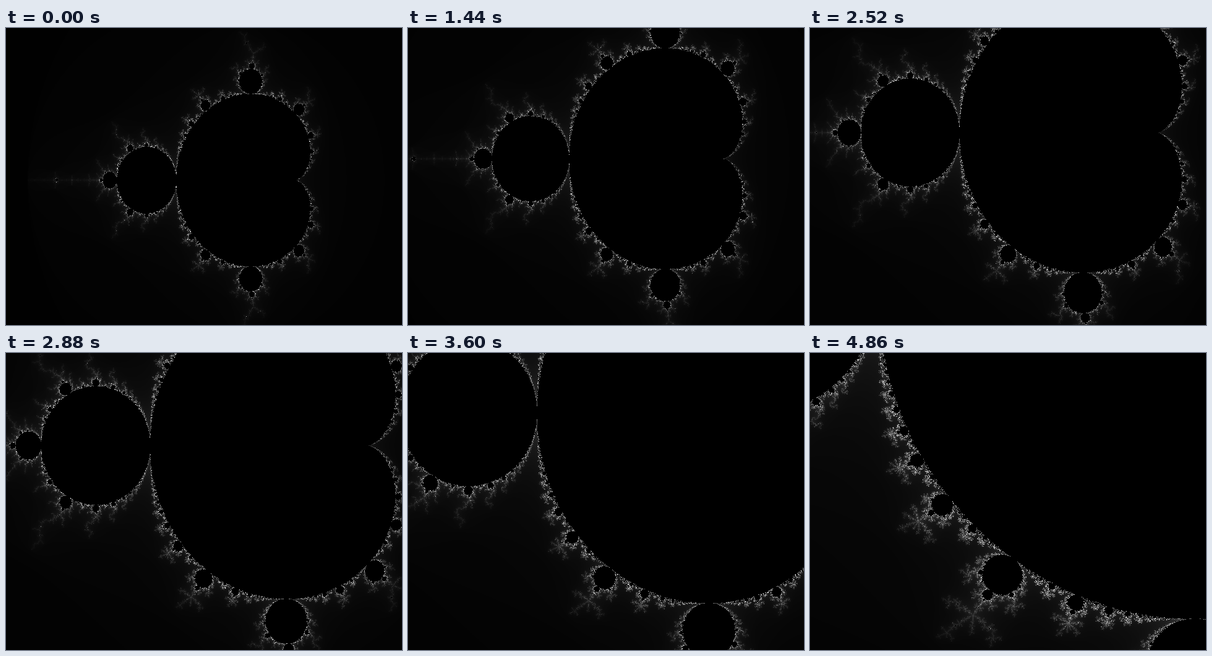
Animation, 640 px wide and 480 px high, one loop 5040 ms. Source, as an HTML page with a canvas:

```html
<!DOCTYPE html>
<html lang="en">
<head>
<meta charset="utf-8">
<title>Mandelbrot zoom</title>
<style>
  html, body { margin: 0; width: 100%; height: 100%; overflow: hidden; background: #000; }
  canvas { display: block; width: 640px; height: 480px; }
</style>
</head>
<body>
<canvas id="stage" width="640" height="480"></canvas>
<script>
const WIDTH = 640, HEIGHT = 480;
const STEP_MS = 180, STEPS = 28;
const MAX_ITER = 255;

const ctx = document.getElementById('stage').getContext('2d');
const cache = [];

// Each edge of the view moves at its own constant speed.
const viewAt = step => ({
  left: -2.18 + 0.04805 * step,
  right: 1.15 - 0.0464 * step,
  top: -1.1445 + 0.0471 * step,
  bottom: 1.094 - 0.01416 * step
});

function insideMainBodies(re, im) {
  const y2 = im * im, dx = re - 0.25;
  const q = dx * dx + y2;
  return q * (q + dx) <= y2 / 4 || (re + 1) * (re + 1) + y2 <= 1 / 16;
}

function escapeTime(re, im) {
  if (insideMainBodies(re, im)) return MAX_ITER;
  let x = 0, y = 0, n = 0;
  while (n < MAX_ITER) {
    const x2 = x * x, y2 = y * y;
    if (x2 + y2 > 4) break;
    y = 2 * x * y + im;
    x = x2 - y2 + re;
    n++;
  }
  return n;
}

function render(step) {
  const { left, right, top, bottom } = viewAt(step);
  const image = ctx.createImageData(WIDTH, HEIGHT);
  const pixels = new Uint32Array(image.data.buffer);
  for (let py = 0, i = 0; py < HEIGHT; py++) {
    const im = top + (bottom - top) * py / HEIGHT;
    for (let px = 0; px < WIDTH; px++, i++) {
      const re = left + (right - left) * px / WIDTH;
      const n = escapeTime(re, im);
      const grey = n === MAX_ITER ? 0 : n;
      pixels[i] = 0xff000000 | grey * 0x010101;
    }
  }
  return image;
}

let shown = -1;
function draw(now) {
  const step = Math.floor(now / STEP_MS) % STEPS;
  if (step !== shown) {
    cache[step] = cache[step] || render(step);
    ctx.putImageData(cache[step], 0, 0);
    shown = step;
  }
}

let start;
function tick(now) {
  if (start === undefined) start = now;
  draw(Math.max(0, now - start));
  requestAnimationFrame(tick);
}

requestAnimationFrame(tick);
</script>
</body>
</html>
```
